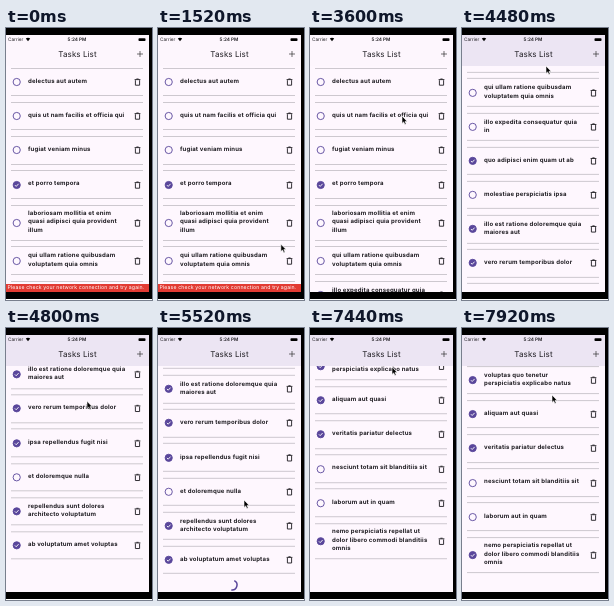
These frames come from a looping animation (146x272 px, 8 s). An HTML page:

```html
<!DOCTYPE html>
<html lang="en">
<head>
<meta charset="utf-8">
<title>Tasks List</title>
<style>
  html, body { margin: 0; width: 100%; height: 100%; overflow: hidden; background: #000; }
  body { position: relative; font-family: Inter, Roboto, sans-serif; color: #1d1b20; text-rendering: geometricPrecision; }
  div, svg { position: absolute; box-sizing: border-box; }
  svg { overflow: visible; }
  #edge { left: 0; bottom: 0; width: 100%; height: 1px; background: #fff; }
  #screen { left: 0; top: 7px; width: 143px; height: 257px; overflow: hidden; background: #fef7fe; }
  #header { left: 0; top: 0; width: 143px; height: 31px; background: #fdf6fd; }
  #header.tinted { background: #ece5f3; }
  .status { top: 2px; line-height: 7px; font-size: 4.7px; white-space: nowrap; }
  .title { left: 0; width: 143px; top: 13px; line-height: 12px; font-size: 8px; letter-spacing: .08px; text-align: center; }
  #view { left: 0; top: 31px; width: 143px; height: 226px; overflow: hidden; }
  #list { left: 0; top: -1.1px; width: 143px; }
  .row { position: relative; height: 34.2px; }
  .row.tall { height: 41.8px; }
  .tile { left: 5.3px; right: 6px; top: 2.9px; bottom: 2.9px; border: solid #cdc8cf; border-width: 1px 0; }
  .label { left: 22px; top: 0; height: 100%; display: flex; align-items: center; white-space: pre;
           font-size: 6px; font-weight: 700; line-height: 8.2px; letter-spacing: .17px; }
  .icons { left: 0; top: 50%; width: 1px; height: 1px; }
  #skeleton { inset: 0; background: #fef7fe; overflow: hidden; }
  .ghost { position: relative; top: 1.3px; height: 29.4px; border-bottom: .5px solid #f1eaf1; }
  .bar { left: 22px; top: 9.8px; width: 98px; height: 9.8px; background: #dedade; }
  #shine { left: 0; top: -20px; width: 48px; height: 270px;
           background: linear-gradient(90deg, #fef7fe00, #fef7fe, #fef7fe00); }
  #snack { left: 0; top: 249px; width: 143px; height: 8px; padding-left: 1.5px; background: #e23b33; color: #fff;
           font-size: 5.2px; line-height: 8px; letter-spacing: .13px; white-space: nowrap; }
</style>
</head>
<body>
<div id="edge"></div>
<div id="screen">
  <div id="view">
    <div id="list"></div>
    <svg id="spinner" width="1" height="1" style="left:74px;top:218.5px">
      <path fill="none" stroke="#5a479b" stroke-width="1.5"/>
    </svg>
    <div id="skeleton"></div>
  </div>
  <div id="header">
    <div class="status" style="left:2px">Carrier</div>
    <div class="status" style="left:0;width:142px;text-align:center;font-weight:600">5:24 PM</div>
    <svg width="143" height="31">
      <path d="M19.8 3.6Q22 2 24.2 3.6L22 6.3Z"/>
      <rect x="132.5" y="3.2" width="7" height="2.8" rx=".8"/>
      <path d="M131 19H137M134 16V22" stroke="#333" stroke-width=".7"/>
    </svg>
    <div class="title">Tasks List</div>
  </div>
  <div id="snack">Please check your network connection and try again.</div>
</div>
<svg id="cursor" width="8" height="10" style="left:0;top:0">
  <path d="M0 0V7.4L1.7 5.9L2.9 8.6L4.2 8L3 5.4H5.2Z" stroke="#fff" stroke-width=".6"/>
</svg>
<script>
const LOOP = 8000, PAGE = 15;
const SKELETON_ON = 1840, SKELETON_OFF = 3440, MORE_START = 4960, MORE_END = 6480;

// A leading * marks a finished task, | breaks the line.
const tasks = `delectus aut autem
quis ut nam facilis et officia qui
fugiat veniam minus
*et porro tempora
laboriosam mollitia et enim|quasi adipisci quia provident|illum
qui ullam ratione quibusdam|voluptatem quia omnis
illo expedita consequatur quia|in
*quo adipisci enim quam ut ab
molestiae perspiciatis ipsa
*illo est ratione doloremque quia|maiores aut
*vero rerum temporibus dolor
*ipsa repellendus fugit nisi
et doloremque nulla
*repellendus sunt dolores|architecto voluptatum
*ab voluptatum amet voluptas
*accusamus eos facilis sint et|aut voluptatem
*quo laboriosam deleniti aut|qui
dolorum est consequatur ea|mollitia in culpa
*molestiae ipsa aut|voluptatibus pariatur dolor|nihil
*ullam nobis libero sapiente ad|optio sint
suscipit repellat esse|quibusdam voluptatem|incidunt
*distinctio vitae autem nihil ut|molestias quo
et itaque necessitatibus|maxime molestiae qui quas|velit
adipisci non ad dicta qui|amet quaerat doloribus ea
*voluptas quo tenetur|perspiciatis explicabo natus
*aliquam aut quasi
*veritatis pariatur delectus
nesciunt totam sit blanditiis sit
laborum aut in quam
*nemo perspiciatis repellat ut|dolor libero commodi blanditiis|omnis`.split('\n');

const $ = id => document.getElementById(id);
const icons = (color, done, trash, fill) => `<svg class="icons">
  <circle cx="10.7" r="3.6" fill="${done ? color : 'none'}" stroke="${color}" stroke-width=".9"/>
  ${done ? '<path d="M8.9 .1L10.2 1.4L12.6 -1.2" fill="none" stroke="#fff" stroke-width=".9"/>' : ''}
  <path d="M129.4 -1.8V3.2H133.6V-1.8M128.6 -2.4H134.4M130.4 -3H132.6" fill="${fill}" stroke="${trash}" stroke-width=".95"/>
</svg>`;

$('list').innerHTML = tasks.map(task => {
  const done = task[0] === '*';
  const lines = task.replace('*', '').split('|');
  return `<div class="row${lines.length > 2 ? ' tall' : ''}"><div class="tile"></div>
    ${icons('#5a479b', done, '#29262c', 'none')}<div class="label">${lines.join('\n')}</div></div>`;
}).join('');
const laterRows = [...$('list').children].slice(PAGE);

$('skeleton').innerHTML = `<div class="ghost">${icons('#dedade', false, '#d6d2d6', '#d6d2d6')}
  <div class="bar"></div></div>`.repeat(8) + '<div id="shine"></div>';

// Keys: [time, ...values]
const scrollKeys = [[4260, 0], [4480, 167.4], [4660, 299], [4800, 322.7], [5000, 317], [5300, 308.2],
  [7080, 308.2], [7280, 600], [7440, 866.8], [7600, 862], [7920, 852.9]];
const cursorKeys = [[1080, 128, 272], [1680, 121, 196], [1840, 120, 185], [3060, 120, 185], [3280, 94, 114],
  [3440, 92, 88], [3880, 92, 88], [4080, 96, 222], [4260, 95, 210], [4480, 84, 38], [4640, 83, 40],
  [4800, 81, 73], [5200, 86, 172], [6640, 86, 172], [6960, 83, 230], [7080, 83, 225], [7280, 82, 60],
  [7440, 82, 39], [7640, 84, 42], [7920, 90, 67]];

function sample(keys, t) {
  const next = keys.findIndex(key => key[0] > t);
  if (next === 0) return keys[0].slice(1);
  if (next < 0) return keys[keys.length - 1].slice(1);
  const a = keys[next - 1], b = keys[next], k = (t - a[0]) / (b[0] - a[0]);
  return a.slice(1).map((v, i) => v + (b[i + 1] - v) * k);
}

const move = (id, x, y, extra = '') => $(id).style.transform = `translate(${x}px,${y}px)${extra}`;
const show = (el, on) => el.style.display = on ? '' : 'none';

function drawSpinner(t) {
  const phase = (t - 5520) / 1333 * 2 * Math.PI;
  const start = -1.1 + phase, end = start + 2.8 + 1.3 * Math.sin(phase);
  const point = a => `${5 * Math.cos(a)} ${5 * Math.sin(a)}`;
  $('spinner').firstElementChild.setAttribute('d',
    `M${point(start)}A5 5 0 ${end - start > Math.PI ? 1 : 0} 1 ${point(end)}`);
}

function frame() {
  const t = performance.now() % LOOP;
  const [scroll] = sample(scrollKeys, t);
  move('list', 0, -scroll);
  move('cursor', ...sample(cursorKeys, t));
  $('header').className = scroll > 0 ? 'tinted' : '';
  laterRows.forEach(row => show(row, t >= MORE_END));

  show($('spinner'), t >= MORE_START && t < MORE_END);
  drawSpinner(t);

  show($('skeleton'), t >= SKELETON_ON && t < SKELETON_OFF);
  const sweep = (t + 1017) % 1500 / 1500;
  move('shine', -95 + 286 * sweep, 0, ' skewX(-13.5deg)');

  show($('snack'), t < 2080);
  move('snack', 0, 8 * Math.max(0, (t - SKELETON_ON) / 240));
  requestAnimationFrame(frame);
}
frame();
</script>
</body>
</html>
```
